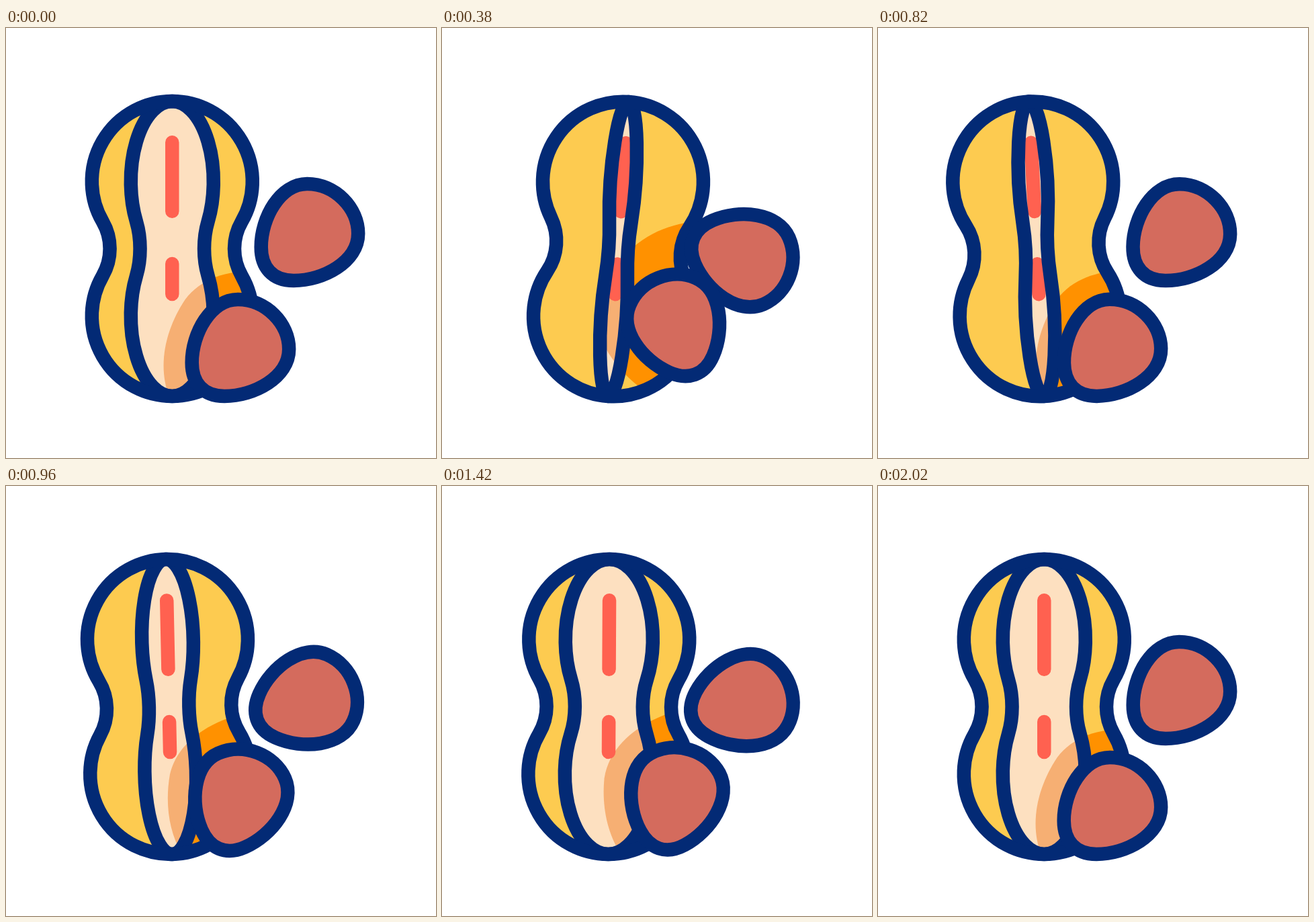
Recreate the animation shown at these times as an HTML page with a canvas. Size 640 px wide and 640 px high, loop 2220 ms.

```html
<!DOCTYPE html>
<html lang="en">
<head>
<meta charset="utf-8">
<title>Peanut</title>
<style>
html, body { margin: 0; height: 100%; overflow: hidden; background: #fff; }
canvas { display: block; width: 100vmin; height: 100vmin; }
</style>
</head>
<body>
<canvas id="stage" width="640" height="640"></canvas>
<script>
const ctx = document.getElementById('stage').getContext('2d');
const LOOP = 2220, STEP = 400, CENTER_X = 247.3, BASE_Y = 548;
const NAVY = '#032a75', YELLOW = '#fdcb50', ORANGE = '#ff9100', CREAM = '#fde0c0',
      TAN = '#f6af73', RED = '#ff6150', NUT = '#d46b5d';

// Shell is centred on x = 0; nut and shadow on the nut's centre.
const shell = new Path2D('M0 109A119.5 119.5 0 0 1 103.5 288.2A80.6 80.6 0 0 0 103.5 368.8' +
  'A119.5 119.5 0 1 1 -103.5 368.8A80.6 80.6 0 0 0 -103.5 288.2A119.5 119.5 0 0 1 0 109Z');
const nut = new Path2D('M-3.5 -72C38.5 -72 72.5 -36 72.5 2C72.5 44 20.5 72 -23.5 72' +
  'C-55.5 72 -72 52 -72 22C-72 -22 -43.5 -72 -3.5 -72Z');
const shade = new Path2D('M-105 75C-125 25 -110 -30 -82 -72C-50 -115 10 -118 45 -112' +
  'C90 -104 130 -70 150 -30L150 150L-90 110Z');
const bars = new Path2D('M0 170.3V272.7M0 351V396');

// One key every STEP ms
const leanKeys = [0, 4, -3, 2, -1, 0];
const openKeys = [.515, .155, .175, .585, .515, .515];
const rollKeys = [0, 1, 0, 1, 0, 0];

function sample(keys, t) {
  const pos = Math.min(t / STEP, keys.length - 1);
  const i = Math.min(Math.floor(pos), keys.length - 2);
  const u = pos - i;
  return keys[i] + (keys[i + 1] - keys[i]) * u * u * (3 - 2 * u);
}

function place(path, matrix) {
  const out = new Path2D();
  out.addPath(path, matrix);
  return out;
}

function fill(path, color, clip) {
  ctx.save();
  if (clip) ctx.clip(clip);
  ctx.fillStyle = color;
  ctx.fill(path);
  ctx.restore();
}

function stroke(path, color, clip) {
  ctx.save();
  if (clip) ctx.clip(clip);
  ctx.strokeStyle = color;
  ctx.stroke(path);
  ctx.restore();
}

function draw(now) {
  const t = now % LOOP;
  const roll = sample(rollKeys, t);
  // The shell rocks about its foot.
  const rock = new DOMMatrix().translate(CENTER_X, BASE_Y).rotate(sample(leanKeys, t)).translate(0, -BASE_Y);
  const body = place(shell, rock);
  const opening = place(shell, rock.scale(sample(openKeys, t), 1));
  const upper = new DOMMatrix().translate(451.7, 304 + 40 * roll).rotate(67 * roll);
  const lower = new DOMMatrix().translate(348.7 - 2 * roll, 476 - 38.5 * roll).rotate(-67 * roll);
  const shadow = place(shade, lower);

  ctx.fillStyle = '#fff';
  ctx.fillRect(0, 0, 640, 640);
  ctx.lineWidth = 20.5;
  ctx.lineCap = ctx.lineJoin = 'round';

  fill(body, YELLOW);
  fill(shadow, ORANGE, body);
  fill(opening, CREAM);
  fill(shadow, TAN, opening);
  stroke(place(bars, rock), RED, opening);
  stroke(opening, NAVY);
  stroke(body, NAVY);

  for (const m of [upper, lower]) {
    const kernel = place(nut, m);
    fill(kernel, NUT);
    stroke(kernel, NAVY);
  }
  requestAnimationFrame(draw);
}
requestAnimationFrame(draw);
</script>
</body>
</html>
```
